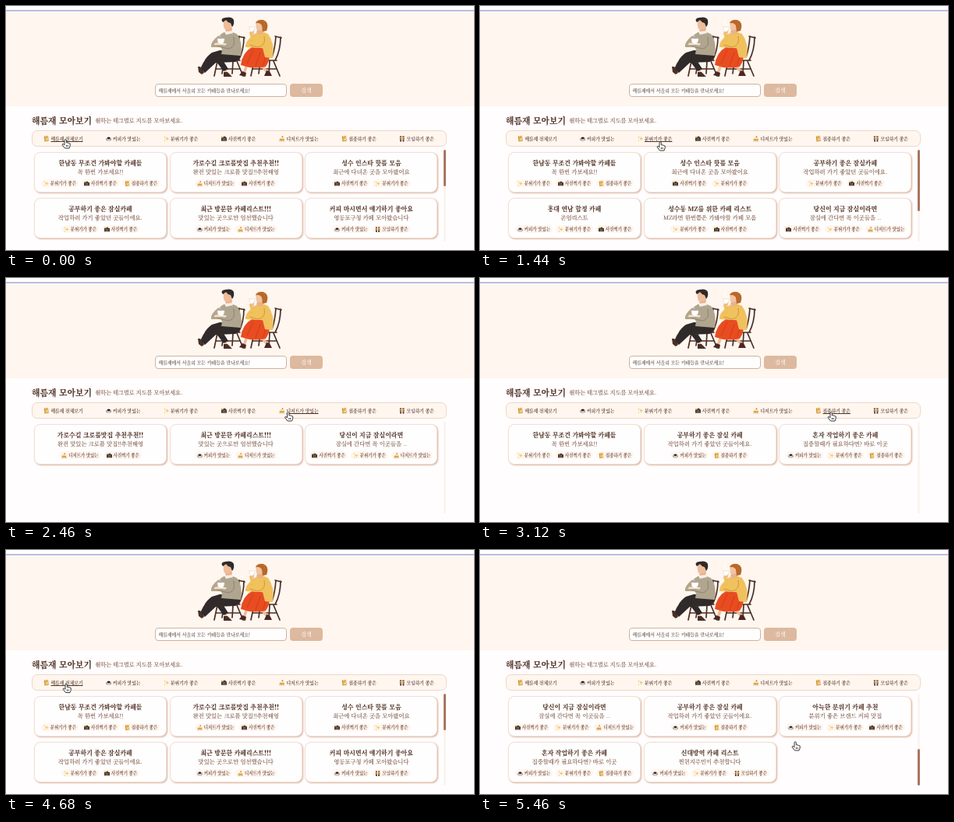
Animation, 600 px wide and 314 px high, one loop 5520 ms. Source, as an HTML page:

```html
<!DOCTYPE html>
<html lang="ko">
<head>
<meta charset="utf-8">
<style>
html, body { margin: 0; width: 600px; height: 314px; overflow: hidden; }
body { position: relative; background: #fffdfd; color: #58392c; white-space: nowrap;
  font-family: "Noto Serif CJK KR", "Noto Sans CJK KR", "Noto Sans CJK", sans-serif;
  -webkit-text-stroke: .12px; }
body > *, .item, .card, .line { position: absolute; box-sizing: border-box; }
.rule { top: 5px; width: 600px; height: 2px; background: #bcbce4; }
.banner { top: 8px; width: 600px; height: 121px; background: #fff6ef; }
.art, .pointer { left: 0; top: 0; }
.search { left: 190.5px; top: 100px; width: 169px; height: 17px; padding-left: 4px; border: 1px solid #cbb3a4;
  border-radius: 4px; background: #fffefd; font-size: 5.9px; line-height: 15px; color: #67544b; }
.button { left: 364px; top: 100px; width: 42px; height: 17px; border-radius: 4px; background: #dcb99f;
  color: #fff9f4; font-size: 7px; line-height: 17px; text-align: center; }
h1 { left: 33px; top: 138.5px; margin: 0; font-size: 10.9px; line-height: 16px; color: #4b2d20; }
.lead { left: 114.5px; top: 139.5px; font-size: 7.1px; line-height: 14px; color: #7d5846; }
.nav { left: 32.5px; top: 160px; width: 532px; height: 21px; border: 1px solid #efd6c7; border-radius: 7px; background: #fff6ef; }
.item { top: 165px; font-size: 5.8px; line-height: 11px; color: #54362a; }
.item.hover { text-decoration: underline; text-underline-offset: 1.2px; text-decoration-thickness: .6px; }
.icon { width: 7.5px; height: 7.5px; margin-right: 2px; vertical-align: -1.5px; }
.list { left: 30px; top: 184px; width: 528px; height: 119px; overflow: hidden; }
.card { width: 170px; height: 52px; border: 1px solid #f3dfd3; border-radius: 8px; background: #fffefe;
  box-shadow: 1px 1px 2px #dab19c; text-align: center; }
.line { left: 0; width: 100%; }
.name { top: 5.5px; font-size: 7.95px; font-weight: 700; line-height: 13px; color: #4f3023; }
.note { top: 17.5px; font-size: 7.3px; line-height: 13px; color: #7d5746; }
.tags { top: 34px; display: flex; justify-content: center; gap: 4px; }
.tag { padding: 0 3px; border-radius: 5px; background: #fff6ef; font-size: 5.45px; line-height: 10px; color: #633f30; }
.tag .icon { width: 7px; height: 7px; }
.track, .thumb { left: 561px; width: 3.2px; border-radius: 2px; }
.track { top: 185px; height: 118px; background: #fbf4ef; }
.thumb { background: #a9765f; }
</style>
</head>
<body>
<div class="rule"></div>
<div class="banner"></div>

<svg class="art" width="600" height="130" fill="none" stroke-linecap="round" stroke-linejoin="round">
  <defs>
    <g id="chair" stroke="#4b2e25" stroke-width="1.7">
      <path d="M305 40Q305 57 298 70M299 39Q298 54 294 66M298 39L306 41M266 70H300M271 71L267 90M296 71L304 90M279 71L277 87M291 71L290 87M270 81L300 81"/>
    </g>
  </defs>
  <use href="#chair"/>
  <use href="#chair" x="47"/>
  <!-- man -->
  <path d="M253 82L250 86M281 80L282 86" stroke="#edbd99" stroke-width="3"/>
  <path d="M274 57L300 58Q302 69 294 72L269 73 255 86 249 81Q255 66 264 60ZM266 67L278 70 285 81 279 84Z" fill="#302b2a"/>
  <path d="M251 88L247 85 246 78 249 78 254 86ZM279 85L284 85 290 91 279 91Z" fill="#4a2f27"/>
  <path d="M279 34Q287 31 296 36Q304 46 301 64L276 62Q278 54 275 53L263 53Q262 47 270 40Z" fill="#b0a58e"/>
  <path d="M292 40Q295 54 285 55L272 52" stroke="#8f846f"/>
  <path d="M281 28L290 28 289 35 282 35Z" fill="#e9b18d"/>
  <path d="M280 33L290 32 291 35 282 37Z" fill="#f6efe4"/>
  <path d="M279 19Q284 16 290 19L290 27Q286 32 281 30Q278 28 279 19Z" fill="#efbd9b"/>
  <path d="M278 21Q274 16 281 15Q290 13 292 18Q293 24 290 27L288 22Q284 21 282 18Z" fill="#302a29"/>
  <path d="M268 49L274 47M280 50L276 47" stroke="#e9b18d" stroke-width="3"/>
  <path d="M271 42H280Q280 49 275 49Q271 49 271 42Z" fill="#fff" stroke="#d8d0c5" stroke-width=".5"/>
  <path d="M268 49H282" stroke="#f8f4ee" stroke-width="1.3"/>
  <!-- woman -->
  <path d="M309 75L305 87M326 75L336 86" stroke="#eebc98" stroke-width="3.5"/>
  <path d="M303 84L308 86 307 91 299 89ZM334 83L338 84 341 90 331 90Z" fill="#4a2822"/>
  <path d="M315 53L337 55Q340 69 333 78Q317 82 301 76Q303 60 315 53Z" fill="#e84c20"/>
  <path d="M317 57L309 74M326 60L320 77M333 63L330 76" stroke="#c93a18" stroke-width=".8"/>
  <path d="M320 35Q328 31 336 36Q345 48 342 67L332 66 329 54 307 53Q306 45 320 35Z" fill="#f0c15d"/>
  <path d="M331 39Q334 51 323 53L313 50M317 38L315 45" stroke="#cd9838"/>
  <path d="M323 27H330V35Q325 38 321 34Z" fill="#e9b18d"/>
  <path d="M320 21Q326 18 331 22L330 29Q325 33 321 30Z" fill="#f2c3a1"/>
  <path d="M320 22Q322 17 330 18Q338 21 334 32L329 33 328 25Q325 21 320 22Z" fill="#b86929"/>
  <path d="M318 47L314 35" stroke="#f0c15d" stroke-width="4"/>
  <path d="M316 36L317 31" stroke="#eebc98" stroke-width="3"/>
  <path d="M312 27H319Q319 33 315 33Q312 33 312 27Z" fill="#fff" stroke="#ddd2c5" stroke-width=".5"/>
  <path d="M314 24Q312 21 315 18M274 39Q272 36 275 33" stroke="#fff" stroke-width="1"/>
</svg>

<div class="search">해름재에서 서울의 모든 카페들을 만나보세요!</div>
<div class="button">검색</div>
<h1>해름재 모아보기</h1>
<div class="lead">원하는 태그별로 지도를 모아보세요.</div>
<div class="nav"></div>
<div class="list"></div>
<div class="track"></div>
<div class="thumb"></div>
<svg class="pointer" width="600" height="314" stroke-linejoin="round">
  <path id="hand" d="M-1 1Q0-1 1.3 1V4.3L3 4.4 4.7 5 6.2 5.6V8.4L5 11.5H-.5L-3.7 7.4Q-4.2 5.8-2.6 6L-1 7.3ZM1.4 7.5V9.5M3.2 7.5V9.5" fill="#fff" stroke="#222" stroke-width=".9"/>
  <path id="arrow" d="M0 0V9.8L2.3 7.7 4 11.4 5.8 10.6 4.2 7H7.2Z" fill="#111" stroke="#fff" stroke-width=".7"/>
</svg>

<script>
const LOOP = 5520, STEP = 60, VIEW = 118, ROW = 59, COLUMN = 173.7;
const $ = selector => document.querySelector(selector);

const book = '<path d="M1 1L8 0 9 9 2 10Z" fill="#c98f35"/><path d="M3 1L8 .5 8.6 8 3.4 8.7Z" fill="#f3cd7a"/><path d="M4 3L7 2.7" stroke="#a56a1c"/>';
const icons = [
  book,
  '<ellipse cx="5" cy="6" rx="5" ry="3" fill="#aaa7a6"/><path d="M2 3H8Q8 8 5 8T2 3" fill="#eee"/><ellipse cx="5" cy="4" rx="2.8" ry="2" fill="#36231d"/>',
  '<path d="M6 1L7 4 10 5 7 6 6 9 5 6 2 5 5 4ZM2 0L2.5 1.5 4 2 2.5 2.5 2 4 1.5 2.5 0 2 1.5 1.5ZM2 7L3 8.5 2 10 1 8.5Z" fill="#f4c869"/>',
  '<path d="M0 3H3L4 1H7L8 3H10V9H0Z" fill="#493b37"/><circle cx="5" cy="6" r="2.1" fill="#a8936f"/><circle cx="5" cy="6" r="1.2" fill="#272c35"/><path d="M0 1H3V3H0Z" fill="#f1c04c"/>',
  '<path d="M1 5L6 1 9 5V9H1Z" fill="#f5c863"/><path d="M1 6H9V7.5H1Z" fill="#c78a45"/><path d="M1 5L6 1 9 5Z" fill="#ffe7b0"/><circle cx="6" cy="1.5" r="1.2" fill="#d9713b"/><path d="M0 9.2H10" stroke="#b9bfc2"/>',
  book,
  '<path d="M1 4H4.2V7H1ZM5.8 4H9V7H5.8Z" fill="#b0703f"/><path d="M1.5 7H4V10H1.5ZM6 7H8.5V10H6Z" fill="#493c3b"/><circle cx="2.7" cy="2" r="1.6" fill="#5d3524"/><circle cx="7.3" cy="2" r="1.6" fill="#5d3524"/><path d="M2 2H3.7V4H2ZM6.5 2H8.2V4H6.5Z" fill="#efb74f"/>'
];
const labels = ['해름재 전체보기', '커피가 맛있는', '분위기가 좋은', '사진찍기 좋은', '디저트가 맛있는', '집중하기 좋은', '모임하기 좋은'];
const itemLeft = [48, 127.5, 201.5, 275.5, 350, 430, 504];
const itemWidth = [50, 45, 45, 45, 51, 45, 45];

// name, note, tag indices
const cafes = [
  ['한남동 무조건 가봐야할 카페들', '꼭 한번 가보세요!!', [2, 3, 5]],
  ['가로수길 크로플맛집 추천추천!!', '완전 맛있는 크로플 맛집!!추천해영', [4, 3]],
  ['성수 인스타 핫플 모음', '최근에 다녀온 곳을 모아봤어요', [3, 2]],
  ['공부하기 좋은 잠실카페', '작업하러 가기 좋았던 곳들이에요.', [2, 3]],
  ['최근 방문한 카페리스트!!!', '맛있는 곳으로만 엄선했습니다', [1, 4]],
  ['커피 마시면서 얘기하기 좋아요', '영등포구청 카페 모아봤습니다', [1, 6]],
  ['홍대 연남 합정 카페', '존엄리스트', [1, 2, 3]],
  ['커피가 정말 맛있는 카페', '원두 향이 좋은 곳들이에요', [1]],
  ['성수동 MZ를 위한 카페 리스트', 'MZ라면 한번쯤은 가봐야할 카페 모음', [2, 3]],
  ['당신이 지금 잠실이라면', '잠실에 간다면 꼭 이곳들을 ..', [3, 2, 4]],
  ['공부하기 좋은 잠실 카페', '작업하러 가기 좋았던 곳들이에요.', [1, 5]],
  ['아늑한 분위기 카페 추천', '분위기 좋은 브랜드 커피 맛집', [1, 2, 3]],
  ['혼자 작업하기 좋은 카페', '집중할때가 필요하다면? 바로 이곳', [1, 2, 5]],
  ['신대방역 카페 리스트', '찐현지주민이 추천합니다', [1, 2, 6]]
];

// time, chosen nav item
const clicks = [[0, 0], [840, 1], [1440, 2], [1980, 3], [2460, 4], [3120, 5], [3720, 6], [4680, 0]];
// start, end, x, y
const moves = [
  [0, 0, 76, 171.5], [0, 600, 149, 173], [840, 1260, 231, 174.5], [1440, 1920, 297, 173],
  [1980, 2280, 361.5, 172.5], [2460, 2880, 450, 172.5], [3120, 3660, 521, 172],
  [4080, 4560, 77, 172], [4680, 5160, 402.5, 245], [5220, 5280, 404, 246.5]
];

const label = i => `<svg class="icon" viewBox="0 0 10 10">${icons[i]}</svg>${labels[i]}`;
function add(parent, className, html) {
  const node = document.createElement('div');
  node.className = className;
  node.innerHTML = html;
  parent.append(node);
  return node;
}

const items = labels.map((_, i) => {
  const node = add(document.body, 'item', label(i));
  node.style.left = itemLeft[i] + 'px';
  return node;
});
const cards = cafes.map(([name, note, tags]) => add($('.list'), 'card',
  `<div class="line name">${name}</div><div class="line note">${note}</div>
   <div class="line tags">${tags.map(i => `<span class="tag">${label(i)}</span>`).join('')}</div>`));
document.body.append($('.pointer'));

const ease = (t, from, to) => {
  const k = to > from ? Math.min(1, Math.max(0, (t - from) / (to - from))) : 1;
  return k * k * (3 - 2 * k);
};

function pointerAt(t) {
  let x = 0, y = 0;
  for (const [from, to, endX, endY] of moves) {
    if (t < from) break;
    const k = ease(t, from, to);
    x += (endX - x) * k;
    y += (endY - y) * k;
  }
  return [x, y];
}

function draw(t) {
  const choice = clicks.filter(([time]) => time <= t).pop()[1];
  const scroll = 3 * ROW * ease(t, 5220, 5460);
  const [x, y] = pointerAt(t);
  let shown = 0, overCard = false;

  cards.forEach((card, i) => {
    const visible = !choice || cafes[i][2].includes(choice);
    card.style.display = visible ? '' : 'none';
    if (!visible) return;
    const left = 6 + COLUMN * (shown % 3);
    const top = 4 + ROW * Math.floor(shown / 3) - scroll;
    card.style.left = left + 'px';
    card.style.top = top + 'px';
    const dx = x - 30 - left, dy = y - 184 - top;
    overCard ||= dx > 0 && dx < 170 && dy > 0 && dy < 52;
    shown++;
  });

  const content = Math.ceil(shown / 3) * ROW;
  const thumb = $('.thumb').style;
  thumb.display = content > VIEW ? '' : 'none';
  thumb.top = 185 + scroll * VIEW / content + 'px';
  thumb.height = VIEW * VIEW / content + 'px';

  const hovered = items.findIndex((_, i) =>
    y > 164 && y < 177 && x >= itemLeft[i] && x <= itemLeft[i] + itemWidth[i]);
  items.forEach((item, i) => item.classList.toggle('hover', i === hovered));

  const hand = hovered >= 0 || overCard || t >= 5280;
  for (const id of ['hand', 'arrow']) {
    const node = $('#' + id);
    node.style.display = (id === 'hand') === hand ? '' : 'none';
    node.setAttribute('transform', `translate(${x} ${y})`);
  }
}

const start = performance.now();
function tick() {
  const t = (performance.now() - start) % LOOP;
  draw(Math.floor(t / STEP) * STEP);
  requestAnimationFrame(tick);
}
tick();
</script>
</body>
</html>
```
